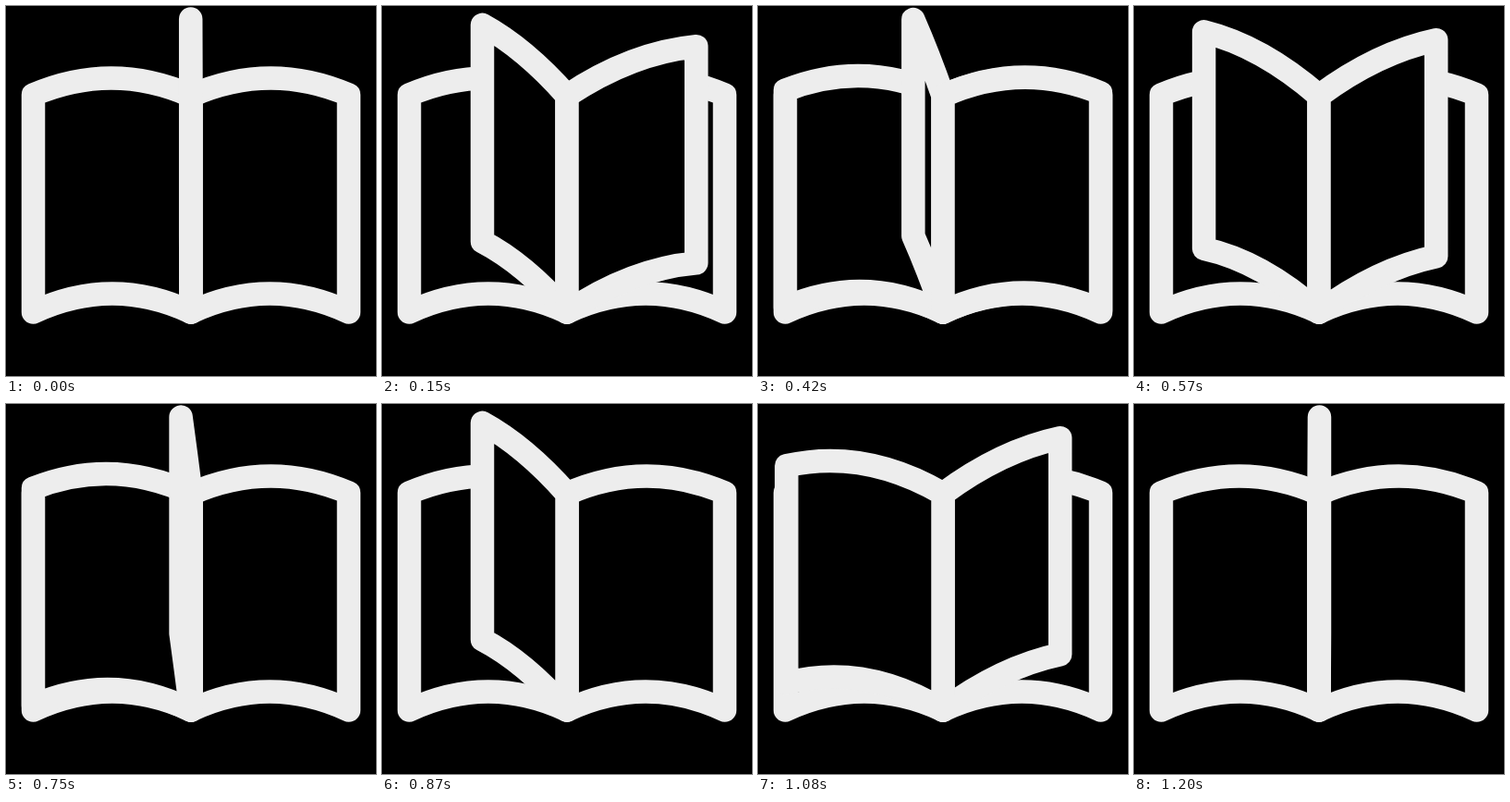
These frames come from a looping animation (400x400 px, 1.23 s). An HTML page without scripts:

```html
<!DOCTYPE html>
<html lang="en">
<head>
<meta charset="utf-8">
<title>Turning pages</title>
<style>
  @property --angle { syntax: "<angle>"; inherits: false; initial-value: 0deg; }
  @property --bow { syntax: "<number>"; inherits: false; initial-value: 0.8; }

  html, body { margin: 0; width: 100%; height: 100%; overflow: hidden; background: #000; }
  svg { display: block; width: 100%; height: 100%; }

  /* A leaf hinged on the spine: cosine gives its width, a power of the sine its lift. */
  .leaf {
    --arched: path("M0 0q85-37.5 170.5-1v235q-85.5-40-170.5 0z");
    --bent: path("M0 0q85-17 170.5 0v234q-85.5-17-170.5 0z");
    --flat: path("M0 0q85 0 170.5 0v234q-85.5 0-170.5 0z");
    --lift: pow(max(0, sin(var(--angle))), var(--bow));
    d: var(--arched);
    fill: #000;
    stroke: #ededed;
    stroke-width: 25.5;
    stroke-linejoin: round;
    vector-effect: non-scaling-stroke;
    transform-origin: 0 0;
    transform: matrix(cos(var(--angle)), calc(-0.487 * var(--lift)), 0, 1, 200, 97);
  }
  .left { --angle: 180deg; }

  .turning { visibility: hidden; animation: turn 1230ms calc(var(--start) - 1530ms) linear infinite; }

  @keyframes turn {
    0% {
      visibility: visible; --angle: 0deg; --bow: 0.8; d: var(--arched);
      animation-timing-function: cubic-bezier(.33, .67, .67, 1);
    }
    12.2% {
      --angle: 41.3deg; --bow: 0.8; d: var(--bent);
      animation-timing-function: cubic-bezier(.33, .67, .67, 1);
    }
    /* Just past upright, since a leaf of zero width is not painted. */
    22.8% { --angle: 90.1deg; --bow: 0.8; d: var(--flat); }
    25.7% { --angle: 90.1deg; --bow: 0.5; d: var(--flat); }
    56.1% { --angle: 179.8deg; --bow: 0.5; d: var(--arched); }
    61% { visibility: visible; --angle: 179.8deg; --bow: 0.5; d: var(--arched); }
    61.01%, 100% { visibility: hidden; --angle: 179.8deg; --bow: 0.5; d: var(--arched); }
  }
</style>
</head>
<body>
<svg viewBox="0 0 400 400">
  <path class="leaf left"/>
  <path class="leaf"/>
  <path class="leaf turning" style="--start: 0ms"/>
  <path class="leaf turning" style="--start: 360ms"/>
  <path class="leaf turning" style="--start: 720ms"/>
</svg>
</body>
</html>
```
